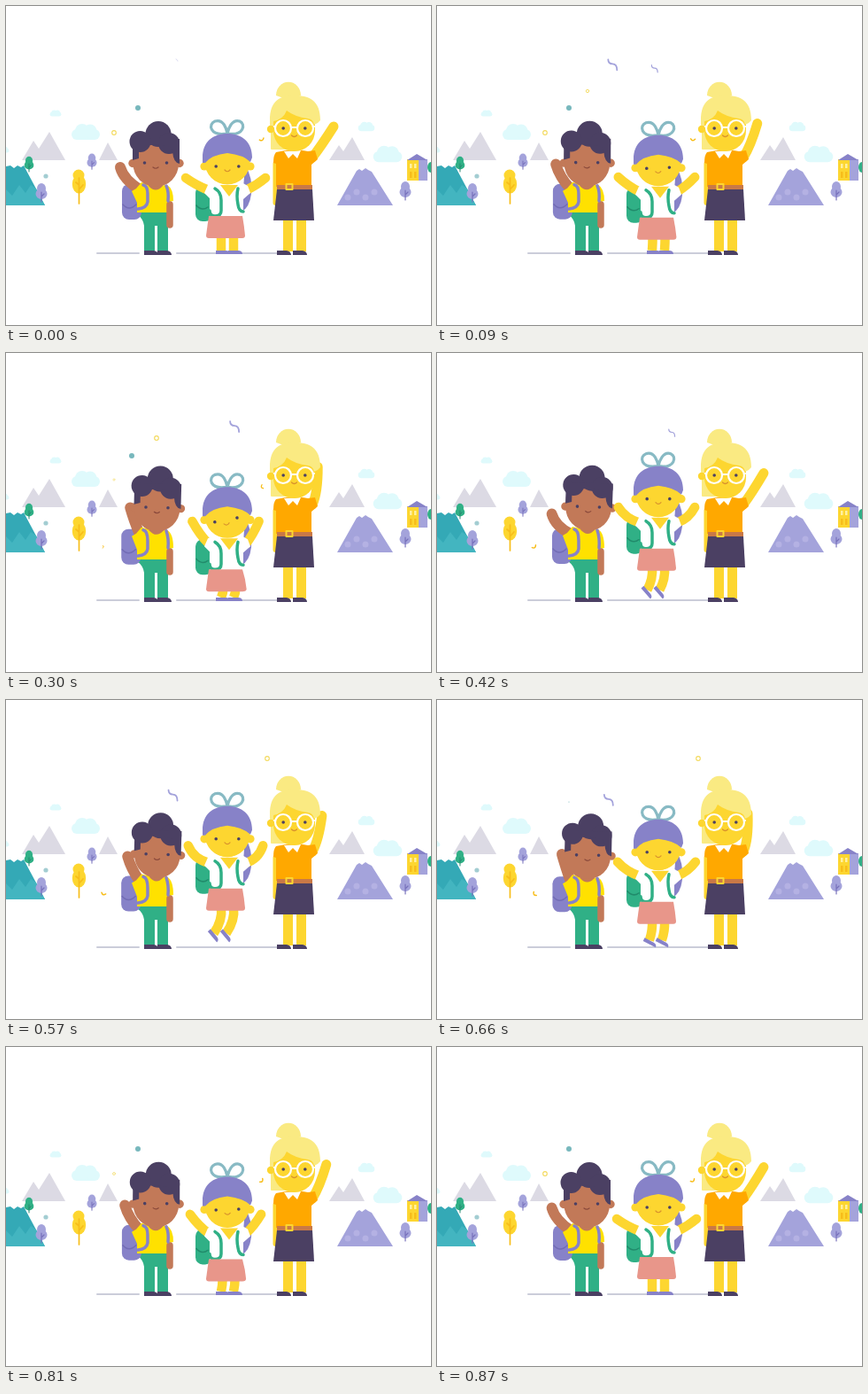
An HTML page with a canvas for the animation above (900 ms loop, 480 by 360 pixels).

```html
<!DOCTYPE html>
<html lang="en">
<head>
<meta charset="utf-8">
<title>Waving friends</title>
<style>
html, body { margin: 0; width: 100%; height: 100%; overflow: hidden; background: #fff; }
canvas { display: block; }
</style>
</head>
<body>
<canvas id="stage" width="480" height="360"></canvas>
<script>
const ctx = document.getElementById('stage').getContext('2d');
const LOOP = 900, STEP = 30, TAU = Math.PI * 2;
const skin = '#fdd630', brown = '#c27958', dark = '#4b4063', purple = '#8782c8',
  green = '#30b086', lilac = '#a4a3db', blonde = '#faea82', bowColor = '#88bac4',
  cloudColor = '#dffafc', grey = '#dcdae4', orange = '#ffa800', gold = '#f7bd1a';

function fill(d, color) {
  ctx.fillStyle = color;
  ctx.fill(new Path2D(d));
}
function stroke(d, color, width, cap = 'round') {
  ctx.strokeStyle = color;
  ctx.lineWidth = width;
  ctx.lineCap = cap;
  ctx.lineJoin = 'round';
  ctx.stroke(new Path2D(d));
}
function oval(x, y, rx, ry, color) {
  ctx.fillStyle = color;
  ctx.beginPath();
  ctx.ellipse(x, y, rx, ry, 0, 0, TAU);
  ctx.fill();
}
const dot = (x, y, r, color) => oval(x, y, r, r, color);
function ring(x, y, r, color, width) {
  ctx.strokeStyle = color;
  ctx.lineWidth = width;
  ctx.beginPath();
  ctx.arc(x, y, r, 0, TAU);
  ctx.stroke();
}
function box(x, y, w, h, r, color) {
  ctx.fillStyle = color;
  ctx.beginPath();
  ctx.roundRect(x, y, w, h, r);
  ctx.fill();
}
// Draws in a frame moved by (dx, dy), turned by deg around (px, py) and scaled
function place(dx, dy, deg, px, py, draw, scale = 1) {
  ctx.save();
  ctx.translate(px + dx, py + dy);
  ctx.rotate(deg * TAU / 360);
  ctx.scale(scale, scale);
  ctx.translate(-px, -py);
  draw();
  ctx.restore();
}
const move = (dx, dy, draw, scale) => place(dx, dy, 0, 0, 0, draw, scale);

// Rises from 0 to 1 and back between two times; power skews the peak
function hump(t, start, end, power = 1) {
  const u = (t - start) / (end - start);
  return u > 0 && u < 1 ? Math.sin(Math.PI * u ** power) : 0;
}

function cloud(x, y, scale) {
  move(x, y, () => {
    box(-16, -3, 32, 12, 6, cloudColor);
    dot(-4, -1, 8, cloudColor);
    dot(5, -1, 7.5, cloudColor);
  }, scale);
}
function tree(x, y, scale, color, trunk) {
  move(x, y, () => {
    oval(0, -4, 5, 6, color);
    oval(0, 2, 6.5, 6, color);
    stroke('M0 0V11M0 5L3 2', trunk, 1.2);
  }, scale);
}
function scenery() {
  cloud(90, 142, 1);
  cloud(56, 121, .4);
  cloud(431, 167, 1.02);
  cloud(407, 136, .58);
  cloud(-3, 162, .4);
  fill('M18 174L31 152 37 161 49 142 67 174Z', grey);
  fill('M105 174L115 154 126 174Z', grey);
  fill('M365 174L376 157 381 164 391 148 405 174Z', grey);

  fill('M0 181L5 180 9 183 13 180 17 182 20 180 44 225H0Z', '#34a9b6');
  fill('M0 207L7 214 15 202 22 211 28 202 34 206 44 225H0Z', '#43b5c0');
  tree(26, 178, .82, green, '#26866f');
  tree(40, 210, 1, lilac, '#7771bb');
  tree(97, 175, .85, lilac, '#7771bb');
  dot(45, 192, 2.6, '#a3cdd2');

  oval(82, 191, 6.5, 6.5, skin);
  oval(82.5, 201, 7.7, 10.5, skin);
  stroke('M82.5 194V223M82.5 207L87 202M82.5 202L79 199', gold, 1.7);

  fill('M374 225L396 186 399 184 402 186 406 183 409 185 413 187 437 225Z', lilac);
  for (let i = 0; i < 4; i++) dot(386 + i * 10, i % 2 ? 210 : 216, 3.5, '#b4b1e3');

  box(453, 173, 14, 24, 0, skin);
  box(466, 173, 10, 24, 0, lilac);
  fill('M453 174L464 167 476 174Z', purple);
  for (const x of [456, 461]) {
    box(x, 178, 2.5, 5, 0, '#fff0a0');
    box(x, 187, 2.5, 7, 0, gold);
  }
  tree(451, 208, 1, lilac, '#7771bb');
  oval(480, 182, 4, 6, green);
  stroke('M103 279H150M193 279H312', '#cbcdda', 2);
}

function shoes(...xs) {
  for (const x of xs) fill(`M${x} 281V276H${x + 11}Q${x + 16} 277 ${x + 16} 281Z`, dark);
}
function eyes(x, y, gap) {
  for (const side of [-gap, gap]) dot(x + side, y, 1.8, dark);
}

function boy(wave, sway) {
  const up = -3 * sway;
  box(156, 240, 12, 37, 0, green);
  box(171, 240, 12, 37, 0, green);
  fill('M148 231H185V240L183 248H156Q155 240 148 235Z', green);
  shoes(156, 171);
  move(-sway, up, () => {
    box(131, 201, 22, 40, 8, purple);
    stroke('M132 224Q139 232 147 224', '#726cb5', 1.5);
  });
  const hx = 135 - 6 * wave, hy = 178 + 4 * wave;
  stroke(`M${hx} ${hy}Q${hx + 4} ${hy + 14} 151 ${207 + up}`, brown, 12);
  fill(`M147 ${206 + up}L153 ${199 + up}Q169 ${203 + up} 182 ${202 + up}Q189 ${206 + up} 189 220
    L185 221V233H148V222L142 ${209 + up}Z`, '#ffe100');
  stroke('M185 224V247', brown, 7.5);
  stroke(`M155 ${202 + up}Q160 ${203 + up} 160 212V221Q159 228 149 229
    M181 ${203 + up}Q184 209 183 220`, purple, 3.5);
  place(1.5 * sway, -3.5 * sway, 2 * sway, 169, 190, () => {
    fill('M161 198H177V203Q169 212 161 203Z', brown);
    for (const x of [143, 196]) dot(x, 177.5, 4.7, brown);
    box(143.5, 148, 51.5, 56, [20, 20, 26, 26], brown);
    dot(172, 144.5, 14.5, dark);
    dot(151.5, 153, 12, dark);
    dot(184, 155, 12, dark);
    fill('M143 150H196V178Q189 177 188 164Q187 158 180 158Q165 155 160 158Q157 163 150 164V172L143 174Z', dark);
    eyes(169, 177, 12.5);
    stroke('M166 182Q169 184.5 172 182', '#8b4a3c', 1.2);
  });
}

function girl(t) {
  const dip = hump(t, 0, 360, 2), land = hump(t, 690, 870, .5), lift = hump(t, 345, 700);
  const squat = dip + land, dy = 9 * dip + 4.5 * land - 26.5 * lift;
  const footX = -9 * lift, footY = -14 * lift, hip = 258 + dy;

  move(0, dy, () => {
    fill('M270 180Q279 193 277 212Q275 228 266 232Z', purple);
    box(214, 203, 19, 40, 8, green);
    stroke('M215 225Q221 232 228 227', '#218b6b', 1.5);
  });
  for (const x of [243, 257]) {
    const fx = x + footX, fy = 276 + footY;
    stroke(`M${x + 3 * squat} ${hip}Q${x + 3 * squat + 2 * lift} ${(hip + fy) / 2} ${fx} ${fy}`, skin, 10.5, 'butt');
    place(footX, footY, 50 * Math.min(1, 1.6 * lift), x, 276, () =>
      fill(`M${x - 6} 280V276H${x + 5}Q${x + 10} 276 ${x + 10} 280Z`, purple));
  }
  const handY = 194 + dy - 14 * squat - 6 * lift, shoulderY = 208 + dy;
  for (const side of [-1, 1]) {
    const handX = 248 + side * (45 - 9 * squat - 3 * lift), shoulderX = 250 + side * 21;
    const elbowX = handX + (shoulderX - handX) * (.45 - .2 * lift);
    const elbowY = handY + (shoulderY - handY) * (.6 + .2 * lift);
    stroke(`M${shoulderX} ${shoulderY}Q${elbowX} ${elbowY} ${handX} ${handY}`, skin, 10.5);
  }
  move(0, dy, () => {
    fill('M228 202L236 199H266L273 203 276 211 268 218V239H230V217L224 211Z', '#fff');
    stroke('M236 206Q243 210 243 219V231Q243 237 236 237Q230 237 230 231M262 206Q260 214 262 224Q263 232 268 232', green, 3.5);
    fill('M242 202H262L252 215Z', skin);
    const sway = 2 * squat;
    fill(`M229 237H267Q${269 + sway} 248 ${270 + sway} 259Q${270 + sway} 262 267 262H229Q226 262 226 259Z`, '#e8968a');

    stroke('M249 144C230 147 228 133 236 130C246 127 249 139 250 144C251 139 255 127 264 130C271 133 269 147 250 144', bowColor, 3.2);
    for (const x of [224, 276]) dot(x, 181, 4.6, skin);
    box(224.5, 150, 51, 51.5, 25.5, skin);
    box(225, 168, 50, 33, [0, 0, 25, 25], skin);
    fill('M222 171C222 153 234 144 250 144S278 153 278 171L276 176Q268 168 250 166Q232 168 225 177L222 177Z', purple);
    place(-2 * dip, 0, -13 * dip - 4 * land, 250, 181, () => {
      eyes(250, 181, 12.8);
      stroke('M247 185Q250 188.5 253 185', '#d8922d', 1.2);
    });
  });
}

function teacher(wave) {
  box(313, 238, 11, 39, 0, skin);
  box(328, 238, 11, 39, 0, skin);
  shoes(306, 324);
  stroke('M304.5 178V222', skin, 6);
  stroke(`M346 171Q${354 + 2 * wave} 158 ${360.5 + 9.5 * wave} ${132 + 4 * wave}`, skin, 11);
  fill('M305 165Q325 160 341 164L349 163 352 173 345 179V204H305V178L302 177Q302 168 305 165Z', orange);
  fill('M306 207H346L348 242H302Z', dark);
  box(306, 202, 40, 5, 0, '#c97946');
  stroke('M316.5 201H323.5V207H316.5Z', skin, 2);

  fill('M314 164L319 172 324 167 329 172 333 163Z', '#fff');
  fill('M305 101A13.8 15 0 0 1 333 101L319 106Z', blonde);
  box(299, 120, 20, 42, 1, blonde);
  dot(299, 139, 4.2, skin);
  box(302, 112, 47, 52, [20, 20, 23, 23], skin);
  fill('M298 129C298 107 309 101 326 101S355 107 355 129Q352 133 348 134Q347 128 341 127Q326 125 317 118Q313 128 302 130V135H298Z', blonde);
  for (const x of [313, 338]) ring(x, 138, 9, '#fff', 2.2);
  eyes(325.5, 138, 12.3);
  stroke('M322 137H329M303 136H304M347 136H348', '#fff', 2.2);
  stroke('M322.5 146Q325.5 149 328.5 146', '#d8922d', 1.2);
}

const shapes = {
  squiggle: () => stroke('M-5 -6Q-5 -1 0 -1Q5 -1 5 6', lilac, 1.8),
  smile: () => stroke('M-2.5 -1Q0 2.5 2.5 -1', gold, 1.5),
  ring: () => ring(0, 0, 2.3, '#f3da60', 1.2),
  dot: () => dot(0, 0, 3, '#78b8bd'),
};
// shape, start, life, x, y
const confetti = [
  ['squiggle', 60, 390, 244, 69],
  ['squiggle', 510, 300, 185, 104],
  ['squiggle', 0, 130, 193, 61],
  ['dot', 660, 460, 149, 115],
  ['dot', 200, 200, 142, 116],
  ['ring', 780, 440, 122, 143],
  ['ring', 60, 340, 170, 96],
  ['ring', 480, 290, 295, 66],
  ['smile', 270, 490, 110, 219],
  ['smile', 690, 570, 289, 151],
];
function scatter(t) {
  for (const [shape, start, life, x, y] of confetti) {
    const u = (t - start + LOOP) % LOOP / life;
    if (u >= 1) continue;
    const drift = shape === 'squiggle' ? life * u / 17 : 0;
    const turn = shape === 'smile' ? 180 * u - 90 : 0;
    const scale = Math.min(1, .2 + 2 * Math.sin(Math.PI * u));
    place(x + drift, y + drift, turn, 0, 0, shapes[shape], scale);
  }
}

function draw(now) {
  const t = Math.floor(now % LOOP / STEP) * STEP;
  // Two waves per loop, with a short hold while the hand is up
  const wave = Math.max(-1, 1.25 * Math.cos(TAU * t / 450) - .25);
  const sway = (1 - Math.cos(TAU * t / LOOP)) / 2;
  ctx.fillStyle = '#fff';
  ctx.fillRect(0, 0, 480, 360);
  scenery();
  scatter(t);
  boy(wave, sway);
  girl(t);
  teacher(wave);
  requestAnimationFrame(draw);
}
draw(performance.now());
</script>
</body>
</html>
```
